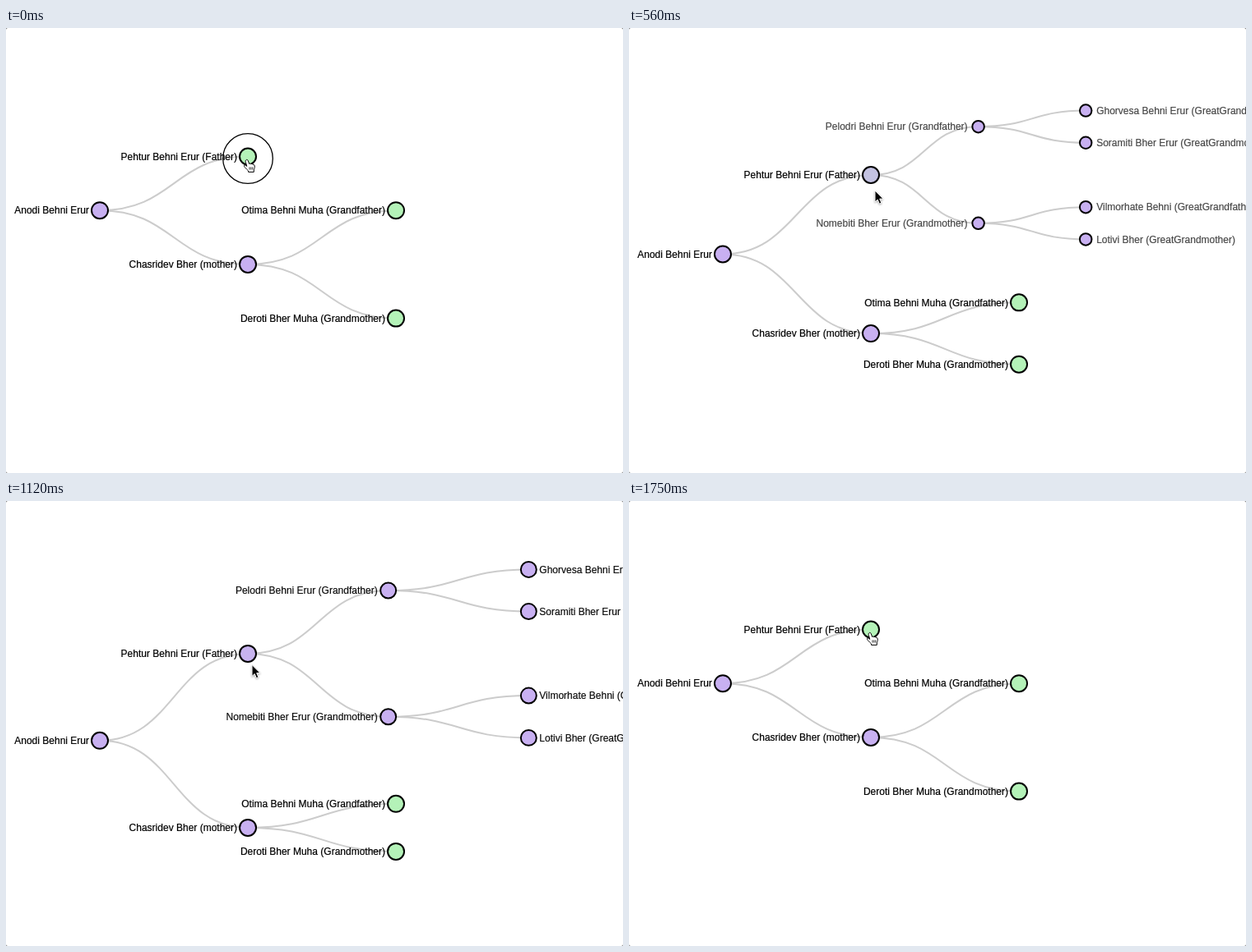
Write an HTML page that moves like this. It is 750x542 px and loops after 1820 ms.

```html
<!DOCTYPE html>
<html lang="en">
<head>
<meta charset="utf-8">
<title>Family tree</title>
<style>
  html, body { margin: 0; width: 100%; height: 100%; overflow: hidden; background: #777; }
  svg { display: block; width: 750px; height: 542px; }
  text { font: 12px "Liberation Sans", Arial, Helvetica, sans-serif; stroke: #000; stroke-width: .2; }
  .link { fill: none; stroke: #ccc; stroke-width: 2; }
  .node circle { stroke: #000; stroke-width: 2; }
  .hand { fill: #fff; stroke: #000; stroke-linejoin: round; }
  .arrow { fill: #000; stroke: #fff; filter: drop-shadow(0 1px 1px rgba(0, 0, 0, .35)); }
</style>
</head>
<body>
<svg viewBox="0 0 750 542">
  <rect width="750" height="542" rx="2.5" fill="#fff"/>
  <g id="links"></g>
  <g id="nodes"></g>
  <circle id="ring" cx="294" cy="159" r="30.3" fill="none" stroke="#000" stroke-width="1.3"/>
  <g id="hand" class="hand">
    <path d="M3.2 1.6C4.2.4 5.4 1 5.9 2.3L7.2 6C8 5.4 9 5.6 9.4 6.4C10.2 5.8 11.2 6 11.6 6.9C12.6 6.5 13.6 7.2 13.8 8.6C14.1 10.5 13.4 12 12.9 13.4V16H6.2V14.6C5 13.4 3.6 12.2 2.6 11C1.2 9.4.6 8.6 1.2 7.9C2 7.2 3.2 7.8 4.4 9L3 4.4C2.7 3.2 2.6 2.3 3.2 1.6Z"/>
    <path d="M7.6 10v3.2M9.5 10v3.2M11.4 10v3.2" stroke-width=".8"/>
  </g>
  <path id="arrow" class="arrow" d="M0 0V14L3.2 11L5.4 16.2L7.9 15.1L5.7 10.1H10Z"/>
</svg>
<script>
const NS = 'http://www.w3.org/2000/svg';
const STEP = 70, COUNT = 26;
const GREEN = [180, 242, 184], PURPLE = [200, 176, 241];
const $ = id => document.getElementById(id);

// label, parent index, column, closed y, open y
const FATHER_Y = 156.5;
const people = [
  ['Anodi Behni Erur', -1, 0, 222.2, 295.6],
  ['Pehtur Behni Erur (Father)', 0, 1, FATHER_Y, 187.5],
  ['Chasridev Bher (mother)', 0, 1, 287.9, 403.9],
  ['Otima Behni Muha (Grandfather)', 2, 2, 222.2, 376.8],
  ['Deroti Bher Muha (Grandmother)', 2, 2, 353.6, 430.9],
  ['Pelodri Behni Erur (Grandfather)', 1, 2, FATHER_Y, 106.4],
  ['Nomebiti Bher Erur (Grandmother)', 1, 2, FATHER_Y, 268.6],
  ['Ghorvesa Behni Erur (GreatGrandfather)', 5, 3, FATHER_Y, 79.4],
  ['Soramiti Bher Erur (GreatGrandmother)', 5, 3, FATHER_Y, 133.4],
  ['Vilmorhate Behni (GreatGrandfather)', 6, 3, FATHER_Y, 241.5],
  ['Lotivi Bher (GreatGrandmother)', 6, 3, FATHER_Y, 295.6]
];

// transition progress and pointer position at each step of the opening half
const progress = [0, 0, .065, .15, .238, .3465, .428, .509, .5906, .68, .765, .85, .93, 1];
const handAt = [[288.4, 159.4], [288.4, 159.4], [288.4, 160], [288.4, 161.3], [288.5, 163], [288.6, 177.4]];
const arrowAt = [[297, 188], [298.6, 195], [299, 198], [299, 199], [299, 199.5]];

const lerp = (a, b, p) => a + (b - a) * p;
const mix = p => `rgb(${GREEN.map((g, i) => Math.round(lerp(g, PURPLE[i], p)))})`;
const ease = t => t < .5 ? 4 * t ** 3 : 1 - 4 * (1 - t) ** 3;

function add(parent, tag, attrs = {}) {
  const el = document.createElementNS(NS, tag);
  set(el, attrs);
  return parent.appendChild(el);
}

function set(el, attrs) {
  for (const key in attrs) el.setAttribute(key, attrs[key]);
}

function show(el, visible) {
  el.style.display = visible ? '' : 'none';
}

function place(el, point) {
  show(el, point);
  if (point) set(el, { transform: `translate(${point})` });
}

const nodes = people.map(([label, parent, col, closed, open], i) => {
  const g = add($('nodes'), 'g', { class: 'node' });
  const circle = add(g, 'circle', { r: 10 });
  const leaf = col === 3;
  const text = add(g, 'text', { x: leaf ? 13 : -13, dy: '.35em', 'text-anchor': leaf ? 'start' : 'end' });
  text.textContent = label;
  const link = parent >= 0 && add($('links'), 'path', { class: 'link' });
  return { g, circle, text, link, parent, closed, open, x: 114 + 180 * col, added: i > 4 };
});

function drawNode(n, i, p) {
  const x = n.added ? lerp(294, n.x, p) : n.x;
  const y = lerp(n.closed, n.open, p);
  n.pos = [x, y];
  set(n.g, { transform: `translate(${n.pos})` });
  set(n.circle, { fill: mix(i === 1 ? p : i === 3 || i === 4 ? 0 : 1) });
  if (n.added) {
    show(n.g, p);
    set(n.circle, { r: 10 * p });
    set(n.text, { opacity: p });
  }
  if (n.link) {
    const [px, py] = nodes[n.parent].pos;
    const mid = (px + x) / 2;
    set(n.link, { d: `M${px} ${py}C${mid} ${py} ${mid} ${y} ${x} ${y}` });
    show(n.link, p || !n.added);
  }
}

function draw(ms) {
  const step = Math.floor(ms / STEP) % COUNT;
  const k = Math.min(step, COUNT - step);   // opens, then plays backwards
  const p = ease(progress[k]);
  nodes.forEach((n, i) => drawNode(n, i, p));
  show($('ring'), k === 0);
  place($('hand'), handAt[k]);
  place($('arrow'), k > 5 && arrowAt[Math.min(k - 6, arrowAt.length - 1)]);
}

const start = performance.now();
function tick() {
  draw(performance.now() - start);
  requestAnimationFrame(tick);
}
tick();
</script>
</body>
</html>
```
